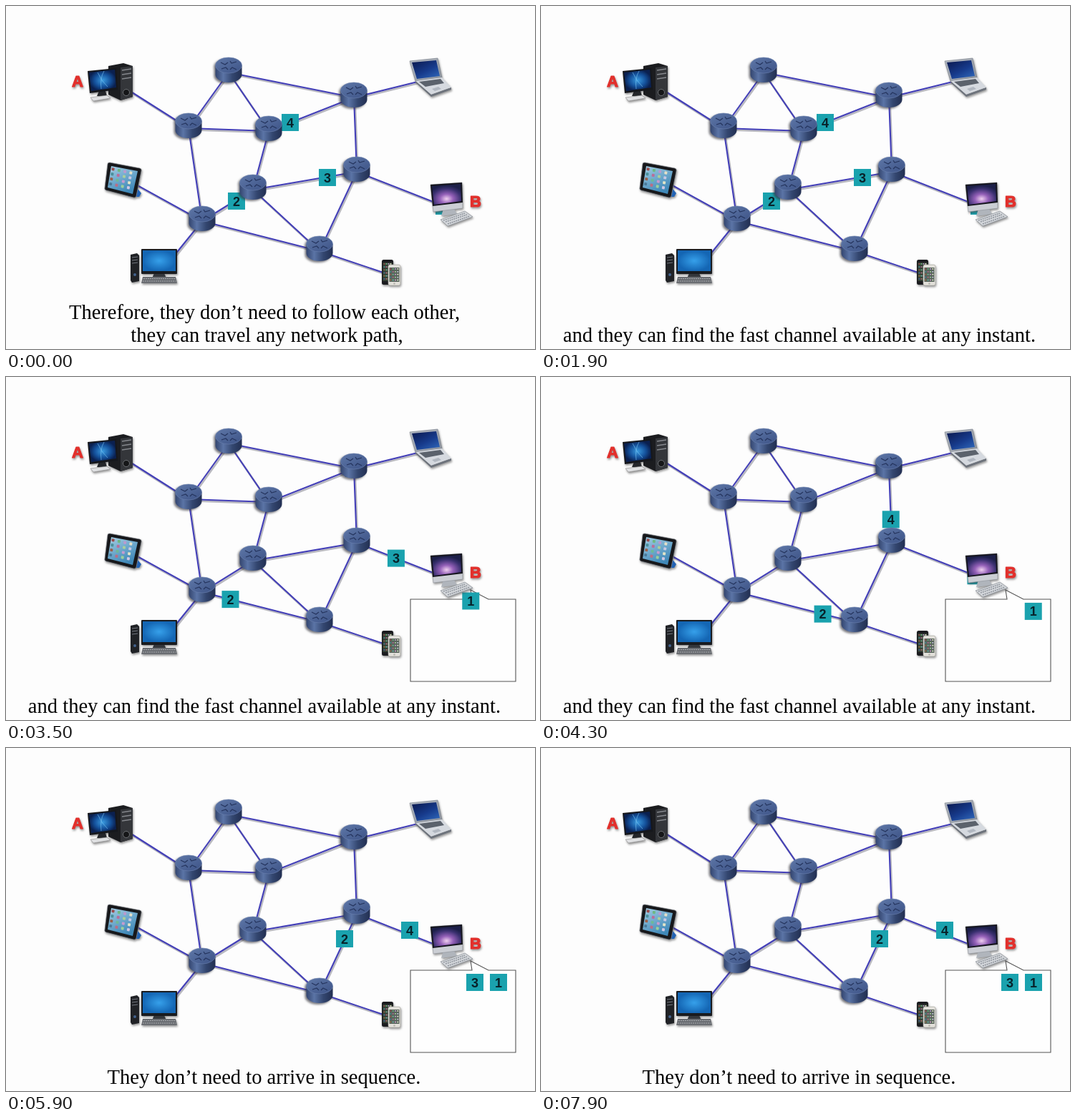
Write an HTML page that moves like this. It is 739 by 480 pixels and loops after 8 s.

```html
<!DOCTYPE html>
<html lang="en">
<head>
<meta charset="utf-8">
<title>Packets on a network</title>
<style>
  html, body { margin: 0; width: 100%; height: 100%; overflow: hidden; background: #fdfdfd; }
  svg { display: block; width: 739px; height: 480px; }
  .caption { font: 28.55px "Liberation Serif", "Times New Roman", serif; text-anchor: middle; fill: #000; }
  .digit { font: bold 18px "Liberation Sans", Arial, sans-serif; text-anchor: middle; fill: #08222a; }
  .label { font: bold 22px "Liberation Sans", Arial, sans-serif; text-anchor: middle; fill: #e2302c;
           stroke: #e2302c; stroke-width: 1.2; stroke-linejoin: round; }
  .shade { filter: blur(.3px) drop-shadow(1px 2px 1.5px rgba(60, 60, 60, .55)); }
  #routers { filter: blur(.3px) drop-shadow(-2px 2px 1.5px rgba(50, 50, 60, .65)); }
</style>
</head>
<body>
<svg viewBox="0 0 739 480">
  <defs>
    <linearGradient id="side"><stop offset="0" stop-color="#33456f"/><stop offset=".3" stop-color="#5b74a6"/><stop offset=".65" stop-color="#33466f"/><stop offset="1" stop-color="#222f52"/></linearGradient>
    <linearGradient id="top" x2="1" y2="1"><stop offset="0" stop-color="#5f78a8"/><stop offset="1" stop-color="#3d5387"/></linearGradient>
    <radialGradient id="blue"><stop offset="0" stop-color="#36a0ea"/><stop offset="1" stop-color="#1466b4"/></radialGradient>
    <linearGradient id="navy" x2=".8" y2="1"><stop offset="0" stop-color="#0a174c"/><stop offset=".6" stop-color="#173b8c"/><stop offset="1" stop-color="#2c62b4"/></linearGradient>
    <linearGradient id="silver" x2="1" y2="1"><stop offset="0" stop-color="#b4bac4"/><stop offset="1" stop-color="#8a919c"/></linearGradient>
    <linearGradient id="sky" x2=".5" y2="1"><stop offset="0" stop-color="#a6cfe4"/><stop offset="1" stop-color="#3f88b8"/></linearGradient>
    <radialGradient id="glow" cx=".5" cy=".72" r=".65"><stop offset="0" stop-color="#f0d0f0"/><stop offset=".35" stop-color="#9460b8"/><stop offset=".75" stop-color="#3a3070"/><stop offset="1" stop-color="#1c1f48"/></radialGradient>
    <radialGradient id="deep"><stop offset="0" stop-color="#3a9be0"/><stop offset=".6" stop-color="#14509a"/><stop offset="1" stop-color="#0a2050"/></radialGradient>
    <g id="router">
      <path d="M-18.500-6V7A18.500 11 0 0 0 18.500 7V-6Z" fill="url(#side)"/>
      <ellipse cy="-6" rx="18.500" ry="11" fill="url(#top)" stroke="#6d84b0" stroke-width=".6"/>
      <path d="M-11-10l6 3l4-3M-10-1l6-2l3 3M11-11l-7 2l-2-3M11 0l-6-3l-3 3" fill="none" stroke="#25355e" stroke-width="1.200"/>
    </g>
  </defs>

  <rect width="739" height="480" fill="#fdfdfd"/>
  <g id="links"></g>
  <path id="bubble" d="M565 311H651L649 298L674 311H712V426H565Z" fill="#fefefe" stroke="#555" stroke-width="1.100"/>
  <g id="tokens"></g>
  <g id="routers"></g>

  <!-- desktop A -->
  <g class="shade">
    <path d="M143 84L164 80L177 84V127L160 132L143 124Z" fill="#1b1c1f"/>
    <path d="M160 86L177 84V127L160 132Z" fill="#34363a"/>
    <path d="M162 90l13-2M162 96l13-2M162 102l13-2" stroke="#85888d" stroke-width="1.300"/>
    <circle cx="168" cy="121" r="4.500" fill="#151618" stroke="#6d7074"/>
    <path d="M130 119h9l2 7h-14Z" fill="#232529"/>
    <path d="M114 91L154 87L156 117L117 122Z" fill="#15171c"/>
    <path d="M116 93L152 89L154 114L119 119Z" fill="url(#deep)"/>
    <path d="M137 91q-6 10-4 25M128 93q5 12 14 20" fill="none" stroke="#7fc8f4" opacity=".6"/>
    <path d="M118 128L141 125L146 129L122 133Z" fill="#dfe0e2" stroke="#888" stroke-width=".6"/>
  </g>

  <!-- tablet -->
  <g class="shade">
    <path d="M180 251L189 262L186 267L171 267Z" fill="#2263b4"/>
    <path d="M145 219L187 227Q190 228 189 231L182 266Q181 269 178 268L140 258Q137 257 138 254L142 221Q142 219 145 219Z" fill="#17181b" stroke="#8b9095" stroke-width=".7"/>
    <path d="M147 224L184 231L177 263L142 254Z" fill="url(#sky)"/>
    <g id="apps" transform="matrix(.96 .2 -.16 .96 148 226)"></g>
  </g>

  <!-- lower desktop -->
  <g class="shade">
    <path d="M174 348L183 346L186 349V385L176 387L174 384Z" fill="#202226"/>
    <path d="M176 352l8-1M176 356l8-1M176 360l8-1" stroke="#747880"/>
    <circle cx="180" cy="376" r="2" fill="#43638e"/>
    <path d="M207 374h14l3 7h-20Z" fill="#34373c"/>
    <rect x="189" y="340" width="50" height="35" rx="1" fill="#191b1f"/>
    <rect x="191" y="342" width="46" height="29" fill="url(#blue)"/>
    <path d="M191 379H237L239 388H189Z" fill="#6a6d72"/>
    <path d="M192 381.500H236M191 385H237" stroke="#a5a8ac" stroke-dasharray="2 1"/>
  </g>

  <!-- laptop -->
  <g class="shade">
    <path d="M564 77L603 73L609 100L572 105Z" fill="url(#silver)" stroke="#777f89" stroke-width=".6"/>
    <path d="M567 79L601 76L606 98L574 102Z" fill="url(#navy)"/>
    <path d="M572 105L609 100L622 114L594 124Z" fill="#d5d9df"/>
    <path d="M594 124L622 114V117L594 127L572 107V105Z" fill="#6d737c"/>
    <path d="M577 106L607 102L612 108L586 113Z" fill="#5b626c"/>
    <path d="M595 116l9-3l4 3l-9 3Z" fill="#b1b7c0"/>
  </g>

  <!-- desktop B -->
  <g class="shade">
    <path d="M611 284L625 282L630 291L608 294Z" fill="#b0b5bc"/>
    <path d="M593 250L637 247L638 283L597 288Z" fill="#cbced4" stroke="#8b9098" stroke-width=".6"/>
    <path d="M593 250L637 247L638 275L596 280Z" fill="#15151e"/>
    <path d="M595 252L635 249L636 273L598 278Z" fill="url(#glow)"/>
    <path d="M607 299L641 287L652 295L617 308Z" fill="#d3d6da" stroke="#858a91" stroke-width=".7"/>
    <path d="M611 300L641 290M614 302L644 292M617 305L648 294" stroke="#8e949c" stroke-width="1.500" stroke-dasharray="2 1"/>
  </g>

  <!-- phones -->
  <g class="shade">
    <rect x="525" y="355" width="16" height="35" rx="2.500" fill="#1b1c1f"/>
    <rect x="526.500" y="359" width="13" height="26" fill="#364236"/>
    <g id="appsL" transform="translate(527.500 360)"></g>
    <rect x="534" y="362" width="17" height="29" rx="2.500" fill="#e2e0da" stroke="#a6a49e" stroke-width=".6"/>
    <rect x="535.500" y="366" width="14" height="20" fill="#56635a"/>
    <g id="appsR" transform="translate(536.500 367)"></g>
    <circle cx="542.500" cy="388.500" r="1.300" fill="#b5b2ac"/>
  </g>

  <g class="shade">
    <text class="label" x="100" y="113">A</text>
    <text class="label" x="656" y="281">B</text>
  </g>

  <g class="caption">
    <g><text x="361" y="437.500">Therefore, they don’t need to follow each other,</text><text x="364.500" y="469.500">they can travel any network path,</text></g>
    <g><text x="361" y="469.500">and they can find the fast channel available at any instant.</text></g>
    <g><text x="360.500" y="469.500">They don’t need to arrive in sequence.</text></g>
  </g>
</svg>

<script>
const LOOP = 8000, STEP = 100;
const byId = id => document.getElementById(id);

function add(parent, name, attrs) {
  const el = document.createElementNS('http://www.w3.org/2000/svg', name);
  for (const key in attrs) el.setAttribute(key, attrs[key]);
  return parent.appendChild(el);
}

// Routers are a-h, devices are capitals, K is the keyboard of B
const nodes = {
  a: [311, 93], b: [255, 171], c: [367, 175], d: [486, 128],
  e: [345, 257], f: [274, 301], g: [490, 232], h: [438, 343],
  A: [170, 117], T: [180, 249], P: [232, 353], L: [575, 106], M: [530, 374], B: [612, 280], K: [616, 301]
};
const line = stops => 'M' + stops.map(s => nodes[s] || s).join('L');

for (const id of 'abcdefgh') {
  const [x, y] = nodes[id];
  add(byId('routers'), 'use', { href: '#router', x, y: y - 4 });
}

const links = 'ab ac ad bc bf cd ce dg ef eg eh fh gh Ab Tf Pf dL hM gB'.split(' ');
const web = links.map(pair => line([...pair])).join('');
add(byId('links'), 'path', { d: web, stroke: '#b9b9c0', 'stroke-width': 2.8, transform: 'translate(1.4 2)' });
add(byId('links'), 'path', { d: web, stroke: '#433fb8', 'stroke-width': 2.1 });

// Small app icons on the touch screens
function icons(id, cols, rows, dx, dy, size) {
  for (let i = 0; i < cols * rows; i++)
    add(byId(id), 'rect', { x: i % cols * dx, y: Math.floor(i / cols) * dy, width: size, height: size,
      rx: size / 5, fill: `hsl(${i * 137 % 360} 35% ${45 + i * 5 % 4 * 13}%)` });
}
icons('apps', 4, 4, 8.6, 7.2, 4);
icons('appsL', 4, 6, 3, 4.2, 1.8);
icons('appsR', 4, 5, 3.3, 3.9, 1.8);

// Distance covered along each route at the two middle moments
const moments = [2400, 2800, 4300, 5250];
const trips = [
  { route: ['B', 'K', [688, 328]], covered: [21, 98] },
  { route: [[322, 273], 'f', 'h', [473, 267]], covered: [24, 179] },
  { route: [[449, 240], 'g', 'B', [655, 328]], covered: [42, 168] },
  { route: [[397, 163], 'd', 'g', [564, 255]], covered: [33, 167] }
];

const tokens = trips.map(({ route, covered }, i) => {
  const g = add(byId('tokens'), 'g', {});
  add(g, 'rect', { x: -12, y: -12, width: 24, height: 24, fill: '#1aa2ae' });
  add(g, 'text', { class: 'digit', y: 6.5 }).textContent = i + 1;
  const path = add(document.querySelector('defs'), 'path', { d: line(route) });
  return { g, path, marks: [0, ...covered, path.getTotalLength()] };
});

function distance(marks, t) {
  const i = Math.max(0, moments.findLastIndex(m => m <= t));
  if (i === moments.length - 1) return marks[i];
  const k = Math.max(0, (t - moments[i]) / (moments[i + 1] - moments[i]));
  return marks[i] + (marks[i + 1] - marks[i]) * k;
}

const captions = [...document.querySelectorAll('.caption > g')];
const captionStart = [0, 500, 5900];
const bubbleStart = 3300;
const show = (el, on) => el.setAttribute('visibility', on ? 'visible' : 'hidden');

function render(t) {
  for (const { g, path, marks } of tokens) {
    const { x, y } = path.getPointAtLength(distance(marks, t));
    g.setAttribute('transform', `translate(${x} ${y})`);
  }
  captions.forEach((el, i) => show(el, t >= captionStart[i] && t < (captionStart[i + 1] ?? LOOP)));
  show(byId('bubble'), t >= bubbleStart);
}

function tick() {
  const t = performance.now() % LOOP;
  render(Math.floor(t / STEP) * STEP);
  requestAnimationFrame(tick);
}
tick();
</script>
</body>
</html>
```
